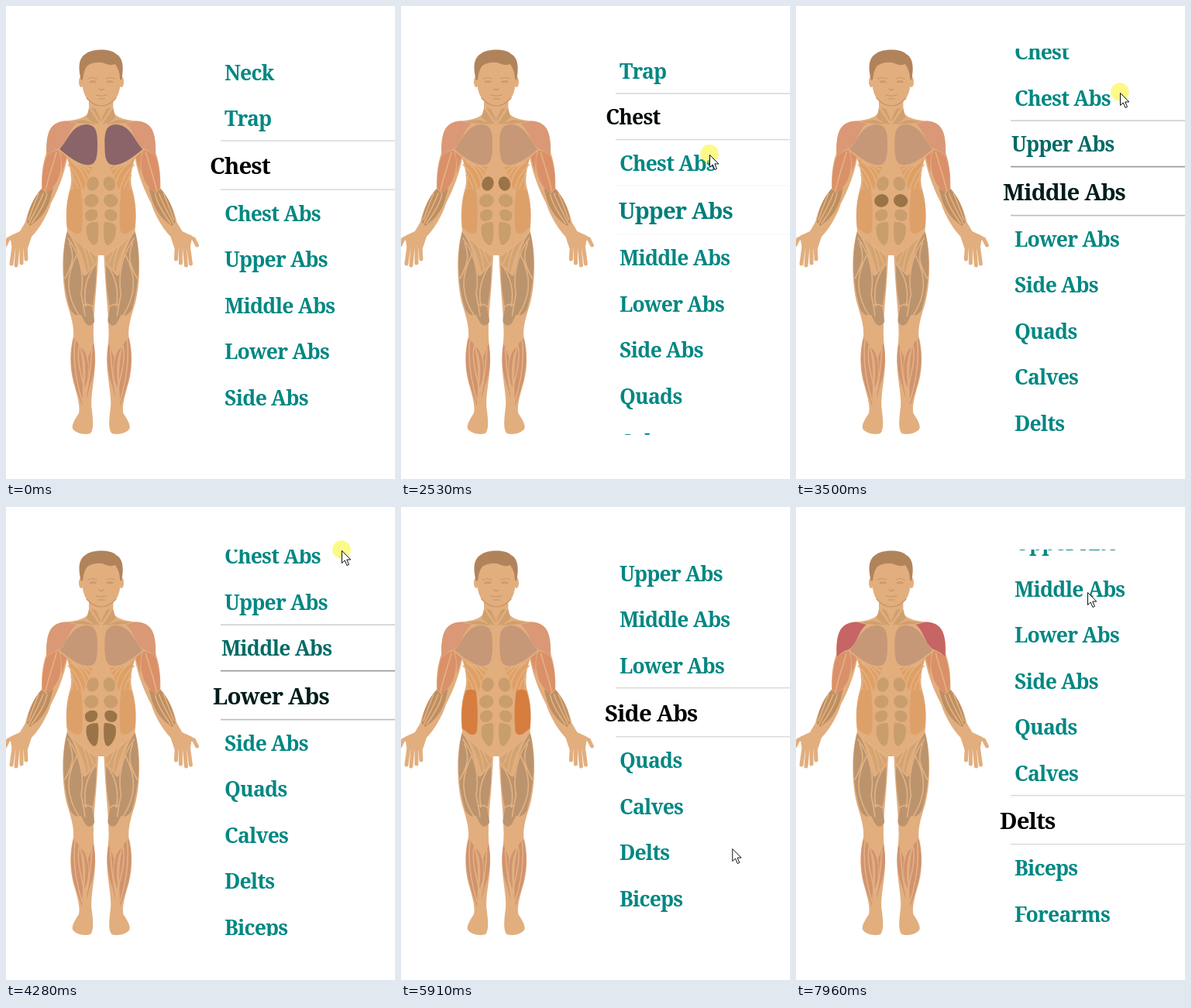
Animation, 502 px wide and 611 px high, one loop 8 s. Source, as an HTML page:

```html
<!DOCTYPE html>
<html lang="en">
<head>
<meta charset="utf-8">
<title>Muscle picker</title>
<style>
html, body { margin: 0; width: 100%; height: 100%; overflow: hidden; background: #fff; }
svg { display: block; }
#list text { font: 700 26.5px "Noto Serif", serif; letter-spacing: -.03em; }
.skin { fill: #e2ae7e; }
.tan { fill: #cf9f6e; }
.quad { fill: #bb946e; }
.calf { fill: #d0936f; }
.arm { fill: #bd8f63; }
.bicep { fill: #da9069; }
.rib { fill: #dfa066; }
.hair { fill: #b1835b; }
.gap { fill: none; stroke: #e4b282; stroke-width: 1.6; stroke-linecap: round; }
.finger { fill: none; stroke: #e2ae7e; stroke-width: 5; stroke-linecap: round; }
.face { fill: none; stroke: #c69465; stroke-width: 1.2; stroke-linecap: round; }
</style>
</head>
<body>
<svg width="502" height="611" viewBox="0 0 502 611">
  <defs><clipPath id="window"><rect x="255" y="55" width="247" height="499"/></clipPath></defs>

  <g id="half">
    <path class="skin" d="M123.5 115H107V136C104 145 90 147 78 148.5C57 149 52 163 52 190C46 208 46 222 46 236C36 247 28 265 25 279L18 291 5 297 8 314 28 313 33 298C43 288 54 269 58 255C67 238 75 218 79 197C84 212 86 226 82 238C77 256 77 275 79 290C71 317 72 360 79 385C84 401 88 414 87 427C82 445 82 467 87 486C92 503 96 517 94 526C87 537 85 541 86 546C91 553 102 554 109 552C114 546 112 533 111 523C108 508 114 486 115 463C116 447 112 434 113 418C113 394 117 369 119 322H123.5Z"/>
    <path class="finger" d="M13 297L3 301-1 309M10 311L7 333M15 312L13 335M20 312L20 332M25 309L26 327"/>

    <path class="tan" d="M107 132L121 153 113 151 104 144ZM101 147L117 153 92 151 84 149ZM110 131L122 150V146L116 133Z"/>
    <path class="m10" d="M53 194C51 165 56 149 78 148.5L91 152C80 160 80 176 68 184Q58 187 53 194Z"/>
    <path class="bicep" d="M52 195Q58 188 68 186C73 200 71 213 67 224Q61 236 53 241L47 236C46 220 48 207 52 195Z"/>
    <path class="bicep" d="M70 188L78 195 72 216Q73 201 70 188Z"/>
    <path class="gap" d="M65 189C61 204 55 220 51 238"/>
    <path class="arm" d="M46 236L52 242 61 235 57 250C52 265 44 276 31 284L27 280C28 264 36 246 46 236Z"/>
    <path class="gap" d="M48 242C43 256 35 269 29 282M53 243C50 256 42 268 33 281M42 242Q34 262 29 276"/>

    <path class="rib" d="M80 197L90 205 112 208 106 220 100 238 86 235 87 220Z"/>
    <path class="gap" d="M80 205C91 214 96 226 99 239M84 201C95 208 101 217 103 228M91 204Q103 210 106 219M84 219Q91 226 93 238M100 206L109 212"/>
    <path class="m7" d="M84 237Q91 234 97 238C98 251 100 263 98 289Q96 297 88 293L79 286C77 264 79 249 84 237Z"/>
    <path class="m2" d="M69 185C80 174 84 154 103 153C116 153 118 162 118 178C118 195 117 205 106 205.5C95 205 82 196 69 185Z"/>

    <ellipse class="m4" cx="112" cy="229.5" rx="7.6" ry="9.3" transform="rotate(18 112 229.5)"/>
    <ellipse class="m5" cx="110.3" cy="251.5" rx="9.2" ry="8.3" transform="rotate(-18 110 251.5)"/>
    <path class="m6" d="M102 268Q106 262 114 263Q119 264 118 271Q116 278 108 278Q101 277 102 268Z"/>
    <path class="m6" d="M104 284Q107 279 118 279Q120 281 119 298Q118 310 113 309C106 304 102 294 104 284Z"/>

    <path class="tan" opacity=".75" d="M86 298L117 325 116 331 104 344Q98 316 86 298Z"/>
    <path class="gap" d="M80 291Q98 313 118 321M97 306Q105 320 107 340M105 314L113 332"/>
    <path class="quad" d="M79 292C72 318 72 355 83 392Q89 402 97 399L102 409Q108 417 114 408C114 398 110 392 112 385C116 365 117 345 116 332C105 347 101 352 99 346C95 325 89 305 79 292Z"/>
    <path class="gap" d="M80 300C97 323 101 350 97 372Q100 387 102 400M91 322C77 349 77 374 95 401M116 333C104 349 99 366 103 388M82 306C89 324 86 334 76 352M101 386Q106 384 111 388"/>

    <path class="calf" d="M87 429C82 451 83 473 92 499L98 516C99 492 102 462 93 435ZM96 441C102 452 104 468 101 493Q107 484 106 464C104 450 101 443 96 441ZM113 436C117 455 114 476 108 491L104 507C105 487 109 477 106 454Z"/>
    <path class="gap" d="M89 432C86 458 90 483 98 510M94 440C91 463 99 479 101 498M111 443C109 463 109 477 104 498"/>
  </g>
  <use href="#half" transform="matrix(-1 0 0 1 245.4 0)"/>

  <g>
    <ellipse class="skin" cx="97" cy="98" rx="3" ry="7"/>
    <ellipse class="skin" cx="149" cy="98" rx="3" ry="7"/>
    <path class="skin" d="M98 78Q123 62 148 78C149 94 148 111 142 119Q133 129 123 129Q113 129 104 119C98 111 97 94 98 78Z"/>
    <path class="hair" d="M97 96C93 80 93 67 104 61C113 55 135 55 142 62C152 67 152 82 149 96L147 94C147 85 144 80 141 75Q135 78 124 73Q113 72 105 77C101 82 100 88 99 95Z"/>
    <path class="face" d="M106 94Q111 91 117 94M129 94Q135 91 140 94M108 98Q112 95 116 98Q112 99 108 98M130 98Q134 95 138 98Q134 99 130 98M120 107Q123 110 126 107M116 115Q123 117 130 115M119 120H127M104 119Q113 129 123 129T142 119"/>
  </g>

  <g id="list" clip-path="url(#window)"></g>
  <g id="cursor">
    <circle cy="-1" r="11.8" fill="#fbf41c" fill-opacity=".52"/>
    <path d="M.5.5V16.5L4.2 13 7 19.5 9.5 18.4 6.8 12H11.8Z" fill="#fff" stroke="#111" stroke-width="1"/>
  </g>
</svg>
<script>
const LOOP = 8000, PITCH = 59.5, EXTRA = 3.5, FADE = 340;
const names = ['Neck', 'Trap', 'Chest', 'Chest Abs', 'Upper Abs', 'Middle Abs', 'Lower Abs',
  'Side Abs', 'Quads', 'Calves', 'Delts', 'Biceps', 'Forearms'];
const picks = [[-FADE, 2], [2520, 4], [3330, 5], [4110, 6], [5090, 7], [6460, 10]];
const tones = { // row: [resting, highlighted]
  2: ['#c69878', '#8b6469'], 4: ['#c99d6c', '#9a7446'], 5: ['#c99d6c', '#9a7446'],
  6: ['#c99d6c', '#9a7446'], 7: ['#dea069', '#d67d3f'], 10: ['#da9876', '#c76465']
};
const scrollTrack = [[1780, 0], [1880, 8], [2530, 61], [3500, 145], [4280, 200.5], [4400, 204],
  [5100, 204], [5200, 220], [5320, 233], [5500, 238],
  [6480, 238], [6600, 257], [6750, 272], [6950, 277.5]];
const cursorTrack = [[420, 433, 567], [520, 400, 470], [640, 320, 300], [740, 288, 210], [830, 299, 166],
  [970, 299, 166], [1200, 345, 200], [1500, 389, 266], [1690, 389, 266], [1880, 389, 245],
  [2530, 398, 192], [3500, 418, 112], [4280, 433, 56], [4400, 433, 56], [4830, 400, 300],
  [5150, 400, 300], [5840, 428, 441], [5910, 428, 441], [6080, 310, 452], [6310, 409, 470],
  [7310, 409, 470], [7960, 376, 110]];
const presses = [[1690, 4340], [5070, 5200], [6450, 6600]];

const mix = (a, b, p) => a + (b - a) * p;
const ease = p => 1 - (1 - p) ** 2.2;

function sample(track, t) {
  const next = track.findIndex(k => k[0] > t);
  if (next === 0) return track[0].slice(1);
  if (next < 0) return track.at(-1).slice(1);
  const a = track[next - 1], b = track[next], p = (t - a[0]) / (b[0] - a[0]);
  return a.slice(1).map((v, i) => mix(v, b[i + 1], p));
}

function add(parent, tag, attrs) {
  const el = document.createElementNS('http://www.w3.org/2000/svg', tag);
  set(el, attrs);
  return parent.appendChild(el);
}
function set(el, attrs) {
  for (const key in attrs) el.setAttribute(key, attrs[key]);
}

const list = document.getElementById('list');
const cursor = document.getElementById('cursor');
const halo = cursor.querySelector('circle');
const rows = names.map(name => {
  const line = () => add(list, 'rect', { x: 277, width: 225, height: 1.6 });
  const row = { lines: [line(), line()], text: add(list, 'text', {}) };
  row.text.textContent = name;
  return row;
});

let lit = -1;
function highlight(current) {
  if (lit === current) return;
  lit = current;
  for (const id in tones)
    document.querySelectorAll('.m' + id).forEach(el => set(el, { fill: tones[id][+(+id === current)] }));
}

function drawList(t) {
  const step = picks.findLastIndex(k => k[0] <= t);
  const [since, current] = picks[step];
  const previous = step ? picks[step - 1][1] : -1;
  const raw = Math.min(1, (t - since) / FADE), p = ease(raw);
  const hump = .16 * Math.sin(Math.PI * raw);
  let top = 55.75 - sample(scrollTrack, t)[0];

  rows.forEach(({ text, lines }, i) => {
    const chosen = i === current;
    const height = PITCH + (chosen ? EXTRA : 0);
    const active = chosen ? p : i === previous ? 1 - p : 0;
    const alpha = active ? .14 * active + hump : 0;
    set(text, {
      x: mix(282, 263, active),
      y: top + height / 2 + (chosen ? 11 : 10),
      fill: `rgb(0 ${mix(135, 0, active)} ${mix(130, 0, active)})`
    });
    text.style.fontSize = chosen ? '29.4px' : '26.5px';
    lines.forEach((line, side) => set(line, {
      y: top + side * height - 1.4, fill: '#000', 'fill-opacity': alpha
    }));
    top += height;
  });
  highlight(current);
}

function draw(t) {
  drawList(t);
  const [x, y] = sample(cursorTrack, t);
  set(cursor, { transform: `translate(${x} ${y})`, visibility: t < 420 ? 'hidden' : 'visible' });
  halo.style.display = presses.some(([a, b]) => t >= a && t < b) ? '' : 'none';
}

function tick() {
  draw(performance.now() % LOOP);
  requestAnimationFrame(tick);
}
tick();
</script>
</body>
</html>
```
